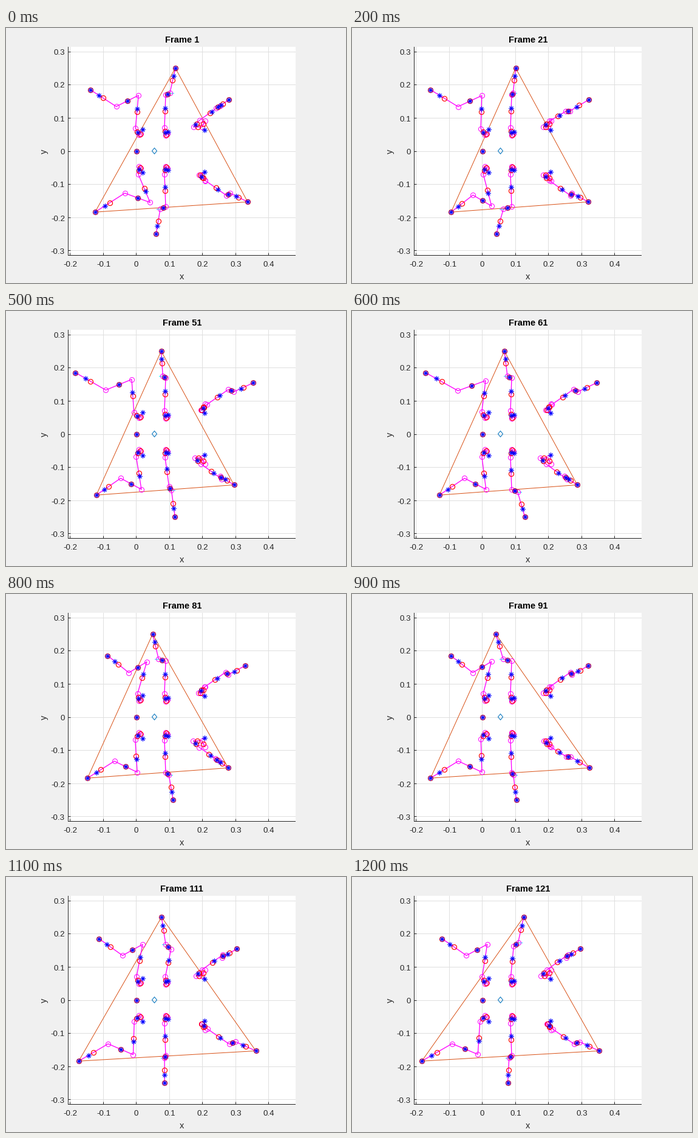
A matplotlib script for the animation above (1300 ms loop, 560x420 px).

```python
import matplotlib.pyplot as plt
import numpy as np
from matplotlib.animation import FuncAnimation

W, H, DPI = 560, 420, 100
PT = 72 / DPI                      # points per pixel
N_FRAMES, INTERVAL = 13, 100
PERIOD = 14.0                      # gait cycle, in frames
SWING = PERIOD / 6
MIRROR_Y = 404.7
X0, Y0, UNIT = 214.6, 203.0, 545.5
LEFT, RIGHT, TOP, BOTTOM = 102.5, 477, 31, 374.5
INK = "#262626"

plt.rcParams["font.family"] = "Liberation Sans"
plt.rcParams["axes.unicode_minus"] = False

# kind: landing x, speed per frame, foot y, knee blend, knee offset, foot star place
KINDS = {
    "front": (168.3, 4.83, 101.5, 0.46, (0, 22.7), 0.67),
    "mid": (287.0, 4.68, 66.0, 0.50, (-1, 18.5), 0.68),
    "rear": (415.5, 4.50, 118.3, 0.56, (-14, 10), 0.37),
}
# kind, lower side?, lift-off time, thigh star place
LEGS = [
    ("front", False, 5.5, 0.6), ("mid", False, 9.95, 0.6), ("rear", False, 0.82, 0.6),
    ("front", True, 12.62, 0.6), ("mid", True, 3.16, 0.4), ("rear", True, 7.78, 0.6),
]
TRIPOD = [1, 3, 5]
BODY_STARS = [(225, 167), (266.5, 171), (327, 168)]


def foot_state(t, lift, land_x, speed):
    """Foot x and raise (0..1) at time t."""
    phase = (t - lift) % PERIOD
    if phase < SWING:
        s = phase / SWING
        stride = speed * (PERIOD - SWING)
        ease = 0.5 * s + 0.25 * (1 - np.cos(np.pi * s))
        return land_x - stride * (1 - ease), np.sin(np.pi * s)
    return land_x - speed * (phase - SWING), 0.0


def front_joints(fx, h):
    u = (fx - 140) / 50
    a, b = np.radians(27 - 30 * u), np.radians(5.8 + 19 * u)
    p1 = np.array([219 - 12.3 * np.sin(a), 175.8 - 12.3 * np.cos(a)])
    p2 = p1 + 54.2 * np.array([np.sin(b), -np.cos(b)]) + (16 * h, 7 * h * h)
    return [(222, 174), (219, 176.3), p1 + (4 * h, -h), p2]


def mid_joints(fx, h):
    return [(265.5, 174), (263, 177), (261 + 1.5 * h, 163.8), (263 + 9 * h, 110.4 + 8.5 * h)]


def rear_joints(fx, h):
    d = fx - 398
    x1 = 328 + 0.3 * d
    return [(327.5, 153), (322.5, 163), (x1 - 10, 163), (x1, 153.7 + 0.05 * d),
            (363 + 0.335 * d - 8 * h, 129 + 0.04 * d + 8.5 * h)]


JOINTS = {"front": front_joints, "mid": mid_joints, "rear": rear_joints}


def leg_points(kind, lower, lift, t):
    land_x, speed, fy, blend, offset, _ = KINDS[kind]
    fx, h = foot_state(t, lift, land_x, speed)
    pts = [np.array(p, float) for p in JOINTS[kind](fx, h)]
    foot = np.array([fx, fy])
    pts += [pts[-1] + blend * (foot - pts[-1]) + offset, foot]
    pts = np.array(pts)
    if lower:
        pts[:, 1] = MIRROR_Y - pts[:, 1]
    return pts


fig = plt.figure(figsize=(W / 100, H / 100), dpi=DPI, facecolor="#f0f0f0")
ax = fig.add_axes([0, 0, 1, 1])
ax.set_xlim(0, W)
ax.set_ylim(H, 0)
ax.axis("off")


def line(xs, ys, color, width, z=1, **kw):
    return ax.plot(xs, ys, color=color, lw=width * PT, zorder=z, **kw)[0]


def rule(xs, ys, color, z=1):
    """Crisp one-pixel line."""
    line(xs, ys, color, 1, z, snap=False, solid_capstyle="butt")


def markers(shape, color, size=8, width=1.0, z=5):
    return ax.plot([], [], ls="none", marker=shape, ms=size * PT, mfc="none",
                   mec=color, mew=width * PT, zorder=z)[0]


def label(x, y, s, px, **kw):
    kw = {"ha": "center", "va": "baseline", "color": INK, **kw}
    return ax.text(x, y, s, fontsize=px * PT, **kw)


def draw_axes():
    ax.add_patch(plt.Rectangle((LEFT, TOP), RIGHT - LEFT, BOTTOM - TOP, fc="white", ec="none", zorder=0))
    for i in range(-2, 5):
        x = np.floor(X0 + UNIT * i / 10) + 0.5
        rule([x, x], [TOP, BOTTOM], "#dfdfdf")
        rule([x, x], [BOTTOM, BOTTOM - 4], INK, 2)
        label(x, 393, f"{i / 10:g}", 13.33)
    for i in range(-3, 4):
        y = np.floor(Y0 - UNIT * i / 10) + 0.5
        rule([LEFT, RIGHT], [y, y], "#dfdfdf")
        rule([LEFT, LEFT + 4], [y, y], INK, 2)
        label(97, y + 5, f"{i / 10:g}", 13.33, ha="right")
    rule([LEFT, LEFT], [TOP, BOTTOM + 0.5], INK, 2)
    rule([LEFT, RIGHT], [BOTTOM, BOTTOM], INK, 2)
    label(289.8, 413.5, "x", 14.67)
    label(62.5, Y0, "y", 14.67, va="center", rotation=90)


draw_axes()
title = label(289.8, 24, "", 14.67, weight="bold", color="black")
tripod = line([], [], "#d95319", 1, 3)
axes_marks = line([], [], "cyan", 1, 3.5)
links = line([], [], "magenta", 1.33, 4)
joints = markers("o", "magenta", z=5)
centres = markers("o", "red", width=1.2, z=6)
stars = markers((8, 2, 0), "blue", z=7)
mass = markers([(-0.8, 0), (0, 1), (0.8, 0), (0, -1), (-0.8, 0)], "#0072bd", 10, z=5)
mass.set_data([244.3], [202.3])


def update(k):
    legs = [leg_points(*leg[:3], k) for leg in LEGS]
    gap = [[np.nan, np.nan]]
    path, rings, reds, blues, ticks = [], [], [(X0, Y0)], [(X0, Y0)], []
    for (kind, _, _, thigh), p in zip(LEGS, legs):
        path += [p, gap]
        rings.append(p[:-1])
        reds += [*((p[:-1] + p[1:]) / 2), p[-1]]
        for i, f in ((-5, 0.38), (-4, thigh), (-3, 0.5), (-2, KINDS[kind][5])):
            blues.append(p[i] + f * (p[i + 1] - p[i]))
        blues.append(p[-1])
        if kind == "mid":
            ticks += [p[-2] - (6, 0), p[-2] + (6, 0), gap[0]]
    for x, y in BODY_STARS:
        blues += [(x, y), (x, MIRROR_Y - y)]

    links.set_data(*np.vstack(path).T)
    joints.set_data(*np.vstack(rings).T)
    centres.set_data(*np.array(reds).T)
    stars.set_data(*np.array(blues).T)
    axes_marks.set_data(*np.array(ticks).T)
    tri = [legs[i][-1] for i in TRIPOD]
    tripod.set_data(*np.array(tri + tri[:1]).T)
    title.set_text(f"Frame {10 * k + 1}")
    return links, joints, centres, stars, axes_marks, tripod, title


anim = FuncAnimation(fig, update, frames=N_FRAMES, interval=INTERVAL, repeat=True, repeat_delay=0)
plt.show()
```
